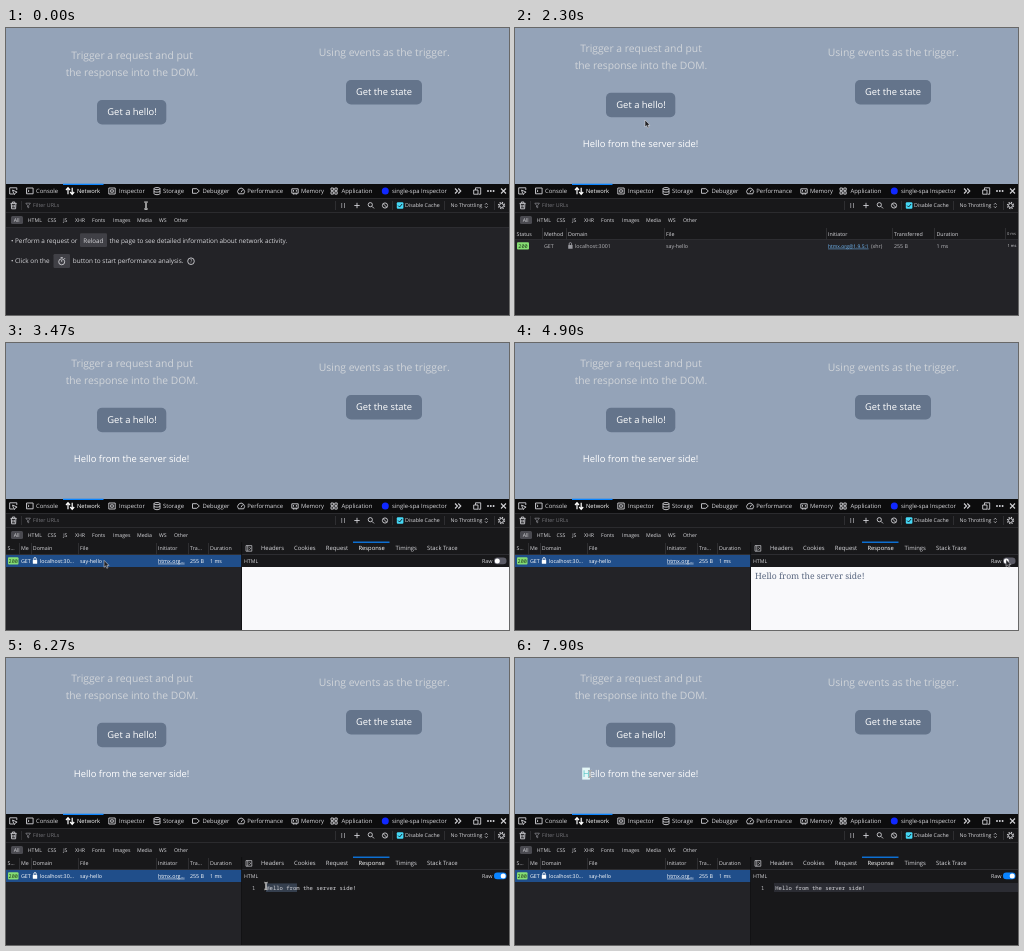
Animation, 503 px wide and 287 px high, one loop 8000 ms. Source, as an HTML page:

```html
<!DOCTYPE html>
<html lang="en">
<head>
<meta charset="utf-8">
<title>Network panel demo</title>
<style>
  html, body { margin: 0; width: 503px; height: 287px; overflow: hidden; background: #232327; }
  svg { display: block; }
  text { font-family: "Open Sans", "Noto Sans", sans-serif; text-rendering: geometricPrecision; white-space: pre; }
  .page { font-weight: 500; }
  .mono { font-family: "Noto Sans Mono", "DejaVu Sans Mono", monospace; }
  .serif { font-family: "Noto Serif", "DejaVu Serif", serif; }
  .mid { text-anchor: middle; }
  .link { text-decoration: underline; }
  .icon { fill: none; stroke: #d0d0d4; stroke-width: .9; }
</style>
</head>
<body>
<svg id="stage" width="503" height="287" viewBox="0 0 503 287"></svg>
<script>
const DIM = '#b8b8bc', LIGHT = '#d7d7db', BODY = '#232327', BAR = '#18181a', LINE = '#38383d', BLUE = '#0a84ff';
const PALE = '#d0d4d9';

const text = (x, y, size, str, fill = LIGHT, cls = '') =>
  `<text x="${x}" y="${y}" font-size="${size}" fill="${fill}" class="${cls}">${str}</text>`;
const box = (x, y, w, h, fill, r = 0, id = '') =>
  `<rect x="${x}" y="${y}" width="${w}" height="${h}" rx="${r}" fill="${fill}" id="${id}"/>`;
const icon = (d, extra = '') => `<path class="icon" d="${d}" ${extra}/>`;
const ring = (x, y, r) => `<circle class="icon" cx="${x}" cy="${y}" r="${r}"/>`;
const group = (id, ...parts) => `<g id="${id}">${parts.join('')}</g>`;
const labels = (y, size, fill, list) => list.map(([x, s]) => text(x, y, size, s, fill)).join('');
const bars = (xs, y, h, fill = LINE) => xs.map(x => box(x, y, .7, h, fill)).join('');
const lock = (x, fill) => box(x, 217, 4.4, 3.8, fill, .5) +
  icon(`M${x + 1} 217v-1.2a1.2 1.2 0 0 1 2.4 0v1.2`, `style="stroke:${fill}"`);

const page = [
  box(0, 0, 503, 156, '#94a3b8'),
  group('request',
    text(126, 31, 10.35, 'Trigger a request and put', PALE, 'mid page'),
    text(126, 48, 10.3, 'the response into the DOM.', PALE, 'mid page'),
    box(91, 72, 69.3, 24.5, '#64748b', 5, 'button'),
    text(126, 87.4, 9.4, 'Get a hello!', '#fff', 'mid page')),
  text(378.3, 28, 10.4, 'Using events as the trigger.', PALE, 'mid page'),
  box(340, 52, 76, 24.5, '#64748b', 5),
  text(378, 67.4, 9.35, 'Get the state', '#fff', 'mid page'),
  group('hello', text(67.8, 119.2, 9.4, 'Hello from the server side!', '#fff', 'page')),
  group('pageSel', box(67.2, 109.6, 7.7, 12, '#e4f7f7'), text(67.8, 119.2, 9.4, 'H', '#5cc4c6', 'page')),
];

const tabs = [
  box(0, 156, 503, 131, BODY),
  box(0, 156, 503, 14, '#0c0c0d'),
  box(0, 170, 503, 29.5, BAR),
  box(0, 170, 503, .6, LINE), box(0, 184.4, 503, .6, LINE), box(0, 199, 503, .6, LINE),
  box(57, 155.7, 40.5, 1.3, BLUE),
  labels(165, 5.9, LIGHT, [[30, 'Console'], [113, 'Inspector'], [157, 'Storage'], [196.5, 'Debugger'],
    [241.3, 'Performance'], [295, 'Memory'], [335.5, 'Application'], [386, 'single-spa Inspector']]),
  text(71, 165, 5.8, 'Network', '#fff', 'page'),
  icon('M7 166H3.7V159.8H10.8V162M6.5 162l1.7 4.8 1-1.8 1.9-.9z'),
  icon('M20.5 160h6.6v5.8h-6.6zM21.8 161.7l1.3 1.2-1.3 1.2'),
  icon('M62 166.3V160M60 162l2-2.3 2 2.3M66.2 159.7V166M64.2 164l2 2.3 2-2.3', 'style="stroke:#fff;stroke-width:1.2"'),
  icon('M102.8 160h6.4v6h-6.4zM104.7 161.8h2.6v2.4h-2.6z'),
  icon('M148 160.6c0-1.4 6-1.4 6 0v5c0 1.4-6 1.4-6 0zc0 1.4 6 1.4 6 0M148 163.1c0 1.4 6 1.4 6 0'),
  icon('M186.5 160.7h4.3l2.5 2.3-2.5 2.3h-4.3z'),
  icon('M232.5 165.8a3.4 3.4 0 1 1 5.2 0zM235 164.3l1.6-2.5'),
  icon('M285.8 160.8h6.4v4.4h-6.4zM287.4 165.2v1.4M289 165.2v1.4M290.6 165.2v1.4M287.5 162v1.7M290.4 162v1.7'),
  icon('M325 160h2.4v2.4h-2.4zM328.8 160h2.4v2.4h-2.4zM325 163.7h2.4v2.4h-2.4zM328.8 163.7h2.4v2.4h-2.4z'),
  '<circle cx="379.3" cy="163" r="3.5" fill="#1028ff"/>',
  icon('M449 160.5l2.5 2.5-2.5 2.5M452.3 160.5l2.5 2.5-2.5 2.5', 'style="stroke-width:1.1"'),
  icon('M469.5 162v-2.2h5.2v6.4h-2.2M467.7 162h4.3v4.2h-4.3z'),
  [482, 484.8, 487.6].map(x => `<circle cx="${x}" cy="163" r=".95" fill="${LIGHT}"/>`).join(''),
  icon('M495 160.5l5 5m0-5l-5 5', 'style="stroke-width:1.1"'),
];

const toolbar = [
  icon('M4.6 175.4h6M6.4 175.2v-1.2h2.4v1.2M5.3 175.4l.3 5.4h4l.3-5.4M6.9 176.8v2.7M8.3 176.8v2.7'),
  icon('M19.8 175.2h4.6l-1.7 2.2v2.4l-1.2-.7v-1.7z', 'style="stroke:#8a8a90;stroke-width:.7"'),
  text(27, 179.4, 5.3, 'Filter URLs', '#77777c'),
  bars([15, 329, 386, 438, 488], 173, 9),
  icon('M335.7 175v5M338.5 175v5', 'style="stroke:#8f8f94"'),
  icon('M348.3 177.5h5.4M351 174.8v5.4'),
  ring(364.3, 176.7, 2.1), icon('M366 178.4l2 2'),
  ring(379, 177.5, 2.6), icon('M377.2 175.7l3.6 3.6'),
  box(390.8, 174.2, 6.6, 6.6, '#45d8f5', 1),
  icon('M392.2 177.6l1.4 1.4 2.5-3', 'style="stroke:#15141a"'),
  text(399, 179.4, 5.3, 'Disable Cache'),
  text(444.5, 179.4, 5.2, 'No Throttling'),
  icon('M479 176.7l1.3-1.5 1.3 1.5M479 178.3l1.3 1.5 1.3-1.5', 'style="stroke-width:.7"'),
  ring(495.5, 177.5, 2),
  '<circle class="icon" cx="495.5" cy="177.5" r="3" stroke-dasharray="1.2 1.156" style="stroke-width:1.3"/>',
  box(5, 188, 12, 8, '#4a4a50', 1.5),
  labels(194, 5.2, LIGHT, [[7.7, 'All'], [21.8, 'HTML'], [41.4, 'CSS'], [57.2, 'JS'], [69, 'XHR'], [86, 'Fonts'],
    [107, 'Images'], [131, 'Media'], [153, 'WS'], [168, 'Other']]),
];

const empty = group('empty',
  labels(214.5, 6.4, LIGHT, [[5, '•'], [9, 'Perform a request or'],
    [103.5, 'the page to see detailed information about network activity.']]),
  box(74, 205.3, 27, 13.6, '#404046', 1.2), text(77.3, 214.5, 6.3, 'Reload'),
  labels(235.4, 6.4, LIGHT, [[5, '•'], [9, 'Click on the'], [66.8, 'button to start performance analysis.']]),
  box(47.5, 226, 16.5, 14, '#404046', 1.2),
  ring(55.7, 233.8, 3), icon('M54.6 229.6h2.2M55.7 233.8v-1.8M58.2 231l.8-.8'),
  ring(185, 233.2, 3.3), text(185, 235.2, 5.2, '?', LIGHT, 'mid'));

const table = group('table',
  box(0, 199, 503, 12.5, BAR), box(0, 211.3, 503, .6, LINE),
  bars([27, 51, 149, 311, 377, 419, 490], 200, 11.4),
  box(0, 212, 503, 12, '#353b48', 0, 'rowHover'),
  labels(207.6, 5.3, LIGHT, [[1.5, 'Status'], [29, 'Method'], [53, 'Domain'], [151, 'File'], [313, 'Initiator'],
    [379, 'Transferred'], [421.5, 'Duration']]),
  text(492, 207.3, 4, '0 ms', DIM),
  box(2, 214.2, 12, 7.2, '#86de74', 1), text(8, 219.7, 5.2, '200', '#1c3a18', 'mid mono'),
  lock(53.2, '#98989e'),
  labels(219.7, 5.3, DIM, [[29, 'GET'], [60, 'localhost:3001'], [151, 'say-hello'], [356, '(xhr)'], [379, '255 B'], [421.5, '1 ms']]),
  text(313, 219.7, 4.95, 'htmx.org@1.9.5:1', '#75bfff', 'link'),
  text(492.5, 219.4, 4, '1 ms', LIGHT));

const details = group('details',
  box(0, 199, 503, 88, BODY),
  box(0, 199, 503, 12.5, BAR), box(0, 211.3, 503, .6, LINE),
  box(0, 212, 235.5, 12, '#204e8a'),
  bars([13, 25, 72, 150, 182, 202], 200, 11.4),
  labels(207.3, 5.3, LIGHT, [[1.5, 'S…'], [15, 'Me'], [26.8, 'Domain'], [74, 'File'], [152, 'Initiator'],
    [184, 'Tra…'], [204, 'Duration']]),
  box(2, 214.2, 10.5, 7.2, '#86de74', 1), text(2.6, 219.7, 5.2, '200', '#1c3a18', 'mono'),
  lock(26.8, '#fff'),
  labels(219.7, 5.3, '#fff', [[15, 'GET'], [34, 'localhost:30…'], [74, 'say-hello'], [184, '255 B'], [204, '1 ms']]),
  text(152, 219.7, 5.3, 'htmx.org…', '#fff', 'link'),
  box(235.3, 199, .8, 88, '#0c0c0d'),
  icon('M240 202.6h5.8v5.6H240zM241.8 202.6v5.6M243.3 204.1l1.4 1.3-1.4 1.3', 'style="stroke-width:.7"'),
  box(347, 198.6, 36.5, 1.2, BLUE),
  labels(207.2, 5.9, LIGHT, [[255, 'Headers'], [288, 'Cookies'], [319.8, 'Request'], [389.5, 'Timings'], [421, 'Stack Trace']]),
  text(352.5, 207.2, 5.8, 'Response', '#fff', 'page'),
  box(236, 212, 267, 12, BAR),
  text(238, 219.7, 5.2, 'HTML', LIGHT), text(476, 219.7, 5.4, 'Raw', LIGHT),
  box(488, 214.6, 12.5, 6.6, '#5b5b66', 3.3, 'track'),
  '<circle id="knob" cy="217.9" r="2.5" fill="#fff"/>',
  box(236, 224, 267, 63, '#f9f9fb', 0, 'preview'),
  group('previewText', text(240, 236, 8.6, 'Hello from the server side!', '#5b6880', 'serif')),
  group('raw',
    box(236, 224, 267, 63, BAR),
    box(259, 225, 244, 9, '#2b2c33', 0, 'activeLine'),
    box(260, 225.4, 31, 8.6, '#353f4e', 0, 'rawSel'),
    text(246, 231.6, 5.5, '1', DIM, 'mono'),
    text(260.3, 231.6, 5.55, 'Hello from the server side!', LIGHT, 'mono')));

const beam = 'M-1.6-3.5Q0-3.5 0-2.6Q0-3.5 1.6-3.5M0-2.6V2.6M-1.6 3.5Q0 3.5 0 2.6Q0 3.5 1.6 3.5';
const pointer = group('cursor',
  '<path id="arrow" d="M0 0V7L1.6 5.6L2.8 8L4 7.4L2.9 5.1H5Z" fill="#222226" stroke="#e8e8ec" stroke-width=".5"/>',
  group('beam', `<path d="${beam}" fill="none" stroke="#eee" stroke-width="1.5"/>`,
    `<path d="${beam}" fill="none" stroke="#333" stroke-width=".5"/>`));

document.getElementById('stage').innerHTML =
  [...page, ...tabs, ...toolbar, empty, table, details, pointer].join('');

const el = id => document.getElementById(id);
const LOOP = 8000;

// Visible spans in ms: id, then [from, to) pairs
const spans = [
  ['empty', 0, 2200], ['hello', 2200, LOOP], ['table', 2200, 3400], ['rowHover', 3160, 3400],
  ['details', 3400, LOOP], ['previewText', 3530, LOOP], ['raw', 5050, LOOP],
  ['activeLine', 6000, 6070, 6670, LOOP], ['rawSel', 6070, 6670], ['pageSel', 7780, LOOP],
  ['beam', 0, 480, 5780, 6680, 7520, LOOP],
];
// Pointer stops: ms, x, y
const stops = [
  [0, 140, 177.5], [430, 140, 177.5], [730, 138, 129], [1170, 138, 129], [1720, 130, 92], [2670, 130, 92],
  [3100, 109, 209.5], [3330, 98, 217.3], [3750, 98, 217.3], [4200, 300, 245], [4300, 300, 245],
  [4850, 491, 216.5], [5170, 491, 216.5], [5930, 301, 230], [6000, 292, 230], [6250, 260, 228],
  [6600, 260, 228], [7370, 49, 109], [7430, 49, 109], [7850, 75, 116], [LOOP, 75, 116],
];

const ease = k => k * k * (3 - 2 * k);
const clamp = k => Math.max(0, Math.min(1, k));

function pointerAt(t) {
  const i = stops.findIndex(s => s[0] > t);
  const [t0, x0, y0] = stops[i - 1], [t1, x1, y1] = stops[i];
  const k = ease((t - t0) / (t1 - t0));
  return [x0 + (x1 - x0) * k, y0 + (y1 - y0) * k];
}

function isOn(t, times) {
  return times.some((from, i) => i % 2 === 0 && t >= from && t < times[i + 1]);
}

function draw(t) {
  for (const [id, ...times] of spans) el(id).style.display = isOn(t, times) ? '' : 'none';
  el('arrow').style.display = el('beam').style.display ? '' : 'none';

  const [x, y] = pointerAt(t);
  el('cursor').setAttribute('transform', `translate(${x} ${y})`);
  el('request').setAttribute('transform', `translate(0 ${t < 2200 ? 0 : -7.2})`);
  el('button').setAttribute('fill', t > 1630 && t < 2200 ? '#56657b' : '#64748b');

  const raw = t >= 5050;
  el('track').setAttribute('fill', raw ? BLUE : '#5b5b66');
  el('knob').setAttribute('cx', 491.3 + 5.9 * clamp((t - 5050) / 80));

  // The selection grows leftwards, one character at a time
  const step = 3.33, left = 260 + step * Math.max(0, Math.round((x - 260) / step));
  const from = t < 6270 ? Math.min(290, left) : 260;
  el('rawSel').setAttribute('x', from);
  el('rawSel').setAttribute('width', 291 - from);
}

function tick(now) {
  draw(now % LOOP);
  requestAnimationFrame(tick);
}
draw(0);
requestAnimationFrame(tick);
</script>
</body>
</html>
```
